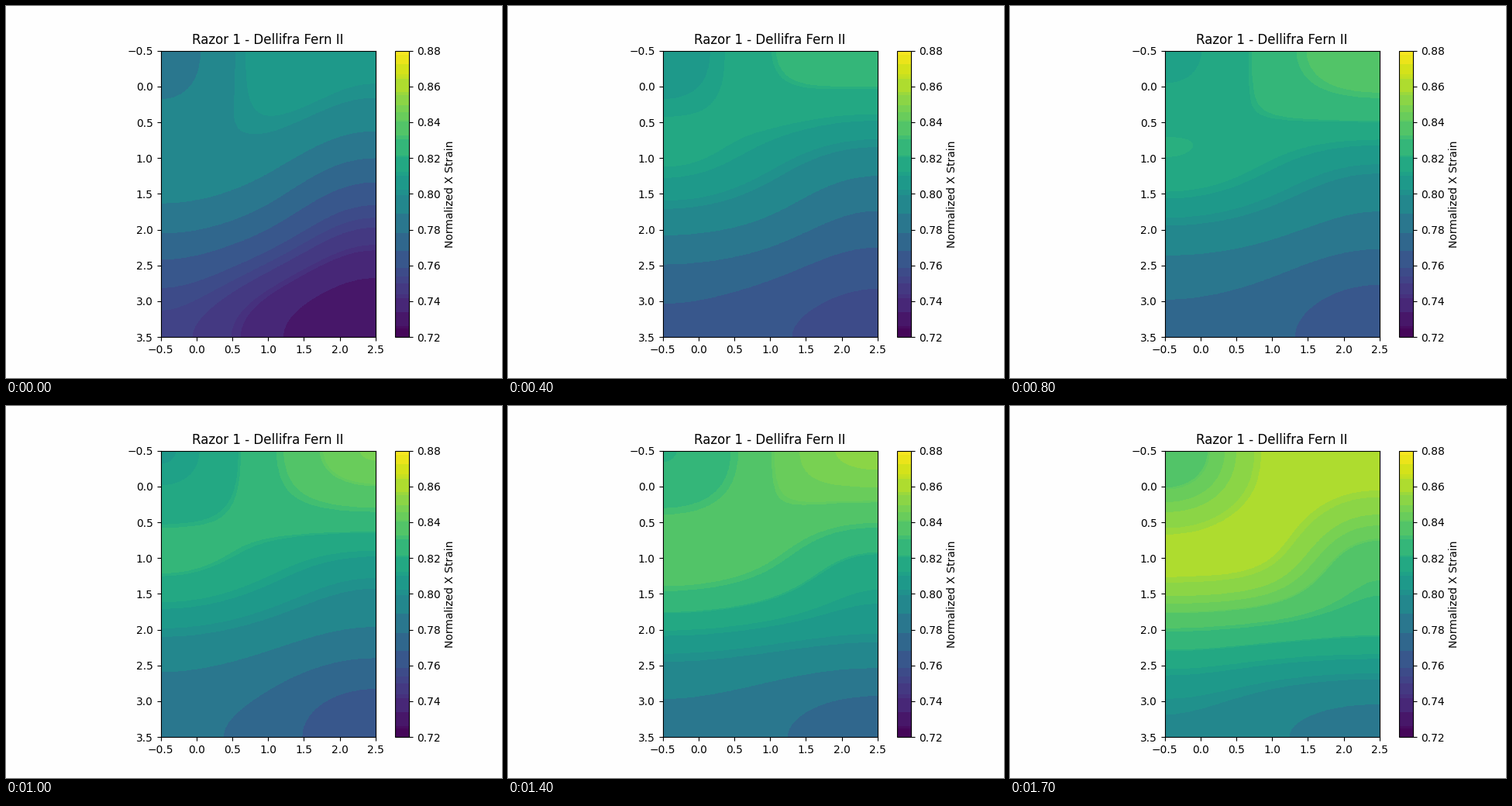
Write a matplotlib script that moves like this. It is 640 by 480 pixels and loops after 1800 ms.

```python
import numpy as np
import matplotlib.pyplot as plt
from matplotlib.animation import FuncAnimation
from matplotlib.colors import ListedColormap

FRAMES, INTERVAL = 18, 100
ROWS, COLS = 4, 3
PAPER = (254 / 255,) * 3


def cosines(n):
    """Cosine waves across n cells, one per column, flat at both edges."""
    return np.cos(np.pi * np.outer(np.arange(n) + 0.5, np.arange(n)) / n)


def amplitudes(w):
    """Wave strengths in 1e-4 strain: rows vary along y, columns along x.

    w runs from -1 at the start of the loop to 1 at its end.
    """
    level = 8010 + 140 * w + 25 * w**2 + 150 * w**3
    sway = -105 - 40 * np.cos(1.6 * np.pi * (w + 1))
    return np.array([
        [level, 30 - 25 * w + 35 * w**2, -10 - 42 * w**2],
        [310 + 40 * w**2, sway, 10 - 90 * w**2],
        [-45 - 40 * w - 75 * w**2, -122, -8],
        [0, -108 - 72 * w, 40 * w],
    ])


def strain(i):
    w = 2 * i / (FRAMES - 1) - 1
    return 1e-4 * cosines(ROWS) @ amplitudes(w) @ cosines(COLS).T


def banded_viridis():
    """Viridis with shades that share a coarse RGB cell merged into one."""
    rgb = (plt.get_cmap("viridis")(np.arange(256))[:, :3] * 255).round().astype(int)
    _, band = np.unique(rgb >> [5, 4, 5], axis=0, return_inverse=True)
    band = band.ravel()
    means = np.array([rgb[band == k].mean(axis=0) for k in range(band.max() + 1)])
    return ListedColormap(np.floor(means[band]) / 255)


fig, ax = plt.subplots(figsize=(6.4, 4.8), dpi=100, facecolor=PAPER)
image = ax.imshow(strain(0), cmap=banded_viridis(), vmin=0.72, vmax=0.88,
                  interpolation="bicubic")
ax.set_title("Razor 1 - Dellifra Fern II")
fig.colorbar(image, ax=ax, label="Normalized X Strain")


def update(i):
    image.set_data(strain(i))
    return [image]


anim = FuncAnimation(fig, update, frames=FRAMES, interval=INTERVAL, repeat=True)
plt.show()
```
